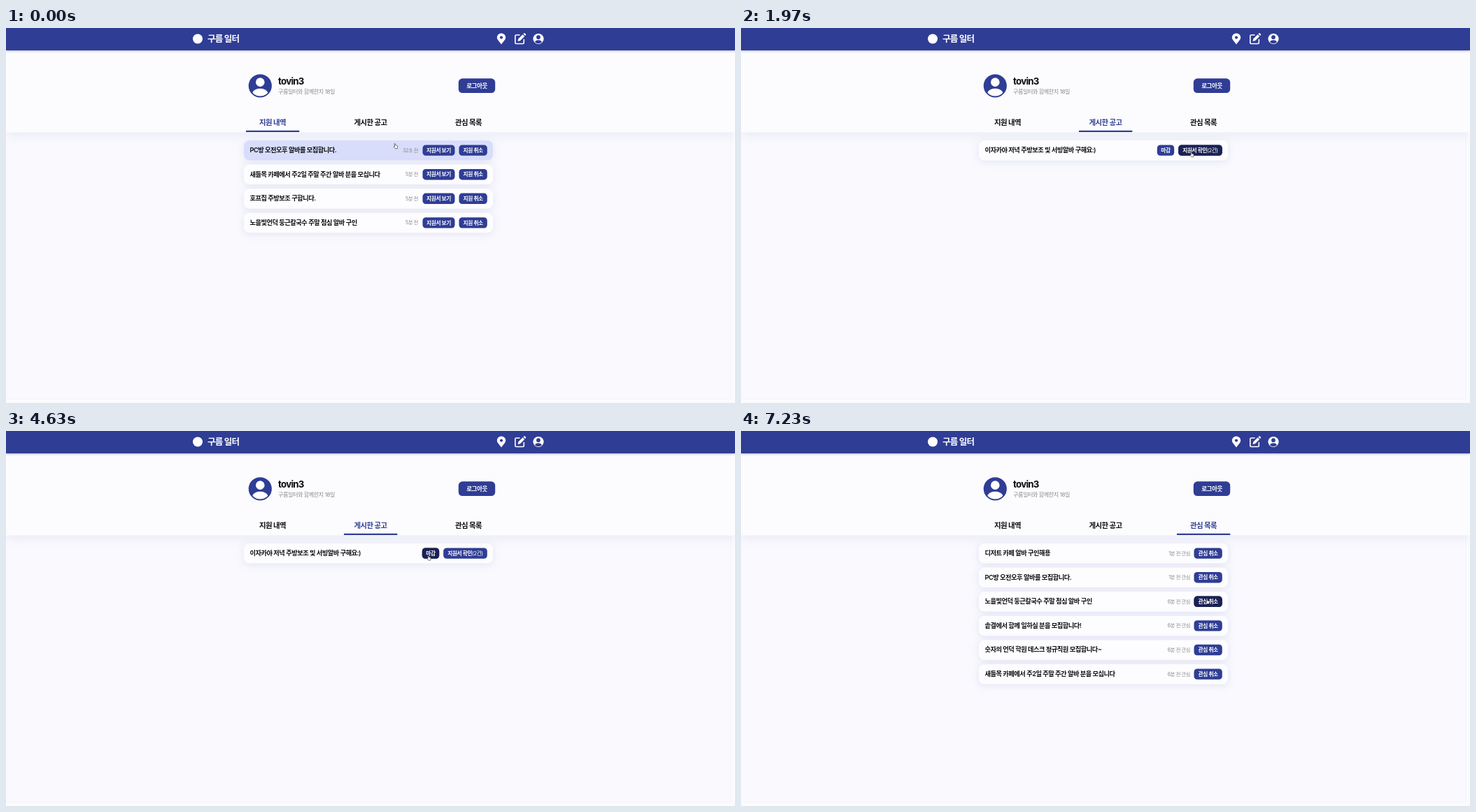
Recreate the animation shown at these times as an HTML page. Size 1042x537 px, loop 7.26 s.

```html
<!DOCTYPE html>
<html lang="ko">
<head>
<meta charset="utf-8">
<title>구름 일터</title>
<style>
html, body { margin: 0; width: 100%; height: 100%; overflow: hidden; background: #f9f9fe; }
svg { display: block; width: 1042px; height: 537px; }
text { font-family: Inter, "Noto Sans CJK KR", "Noto Sans CJK", sans-serif; letter-spacing: -.055em; white-space: pre; }
.card { filter: drop-shadow(0 2px 6px #2e3e951c); }
.bar { filter: drop-shadow(0 1px 1.5px #2e3e9566); }
.panel { filter: drop-shadow(0 3px 8px #2e3e9516); }
</style>
</head>
<body>
<svg id="stage" viewBox="0 0 1042 537"></svg>
<script>
const LOOP = 7260, NAVY = '#2f3d95', DARK = '#1a2153', GRAY = '#8a8a90', RED = '#d5302f';
const FADE = 90;
const at = { open: 450, close: 960, posts: 1400, applicants: 2130, back: 3900, likes: 5485, drop1: 6300, drop2: 7000 };

// cursor stops: time, x, y
const path = [
  [0, 557, 169], [60, 557, 169], [350, 618, 177], [480, 618, 177],
  [840, 622, 237], [970, 622, 237], [1340, 521, 138], [1450, 521, 138],
  [1890, 644.5, 181], [2180, 644.5, 181], [2700, 535, 174], [3430, 535, 174],
  [3820, 278, 16], [3950, 278, 16], [4500, 604.5, 181.5], [4950, 604.5, 181.5],
  [5430, 638, 142], [5620, 638, 142], [6080, 667, 211], [6350, 667, 211],
  [6650, 667, 244], [LOOP, 667, 244]
];

const applied = [
  ['PC방 오전오후 알바를 모집합니다.', '32초 전'],
  ['새들목 카페에서 주2일 주말 주간 알바 분을 모십니다', '5분 전'],
  ['호프집 주방보조 구합니다.', '5분 전'],
  ['노을빛언덕 둥근칼국수 주말 점심 알바 구인', '5분 전']
];
const liked = [
  ['디저트 카페 알바 구인해용', '1분 전 관심'],
  ['zv38 오늘 저녁 알바 구합니다. 급구!!', '1분 전 관심', at.drop1],
  ['PC방 오전오후 알바를 모집합니다.', '1분 전 관심'],
  ['호프집 주방보조 구합니다.', '6분 전 관심', at.drop2],
  ['노을빛언덕 둥근칼국수 주말 점심 알바 구인', '6분 전 관심'],
  ['솥결에서 함께 일하실 분을 모집합니다!', '6분 전 관심'],
  ['숫자의 언덕 학원 데스크 정규직원 모집합니다~', '6분 전 관심'],
  ['새들목 카페에서 주2일 주말 주간 알바 분을 모십니다', '6분 전 관심']
];

let now = 0, zones = [], blocked = false;

const clamp = v => Math.max(0, Math.min(1, v));
const smooth = v => (v = clamp(v), v * v * (3 - 2 * v));
const since = (start, length = FADE) => smooth((now - start) / length);

function cursorAt(t) {
  const i = Math.max(1, path.findIndex(p => p[0] >= t));
  const [a, b] = [path[i - 1], path[i]];
  const k = smooth((t - a[0]) / (b[0] - a[0]));
  return [a[1] + (b[1] - a[1]) * k, a[2] + (b[2] - a[2]) * k];
}

const inside = ([px, py], [x, y, w, h]) => px >= x && px <= x + w && py >= y && py <= y + h;

// share of the last moments the cursor spent in a box gives the fade
function hover(box, holes = []) {
  if (blocked) return 0;
  zones.push(box);
  const n = 9;
  let sum = 0;
  for (let i = 0; i < n; i++) {
    const p = cursorAt(Math.max(0, now - i * FADE / n));
    if (inside(p, box) && !holes.some(h => inside(p, h))) sum++;
  }
  return sum / n;
}

const rect = (x, y, w, h, fill, r = 0, extra = '') =>
  `<rect x="${x}" y="${y}" width="${w}" height="${h}" rx="${r}" fill="${fill}" ${extra}/>`;

const text = (x, y, s, size, fill = '#0c0c10', weight = 400, anchor = 'start') =>
  `<text x="${x}" y="${y + size * .36}" font-size="${size}" fill="${fill}" font-weight="${weight}" text-anchor="${anchor}">${s}</text>`;

const line = (d, color, width) =>
  `<path d="${d}" fill="none" stroke="${color}" stroke-width="${width}" stroke-linecap="round" stroke-linejoin="round"/>`;

const avatar = (x, y, r, back, front) => `<g transform="translate(${x} ${y}) scale(${r})">
  <circle r="1" fill="${back}"/><circle cy="-.31" r=".38" fill="${front}"/>
  <path d="M-.66 .6C-.5 .12 .5 .12 .66 .6A.89 .89 0 0 1-.66 .6Z" fill="${front}"/></g>`;

function button(box, label, size = 7.7, r = 4.5) {
  const [x, y, w, h] = box;
  return rect(...box, NAVY, r) + rect(...box, DARK, r, `opacity="${hover(box)}"`) +
    text(x + w / 2, y + h / 2, label, size, '#fff', 600, 'middle');
}

// buttons: [x, width, label]
function row(i, title, note, noteX, buttons) {
  const y = 161 + i * 34.6, box = [340, y, 356, 28.5];
  const boxes = buttons.map(([x, w]) => [x, y + 6.4, w, 15.4]);
  return rect(...box, '#fdfdff', 8, 'class="card"') +
    rect(...box, '#d8ddfc', 8, `opacity="${hover(box, boxes)}"`) +
    text(348.5, y + 13.7, title, 9.25, undefined, 600) +
    text(noteX, y + 14, note, 7.2, GRAY, 400, 'end') +
    buttons.map((b, k) => button(boxes[k], b[2])).join('');
}

function list(tab) {
  if (tab == 0) return applied.map(([title, ago], i) =>
    row(i, title, ago, 589, [[595.5, 46, '지원서 보기'], [647.5, 40.3, '지원 취소']])).join('');
  if (tab == 1) return row(0, '이자카야 저녁 주방보조 및 서빙알바 구해요:)', '', 589,
    [[594.8, 24.4, '마감'], [625.2, 62.6, '지원서 확인<tspan font-weight="400">(2건)</tspan>']]);
  return liked.filter(item => !(now >= item[2])).map(([title, ago], i) =>
    row(i, title, ago, 642, [[647.5, 40.3, '관심 취소']])).join('');
}

function mainHeader() {
  return rect(0, 0, 1042, 32, NAVY, 0, 'class="bar"') +
    '<circle cx="274" cy="15.5" r="7" fill="#fff"/>' +
    text(288, 15.5, '구름 일터', 12.5, '#fff', 800) +
    '<path d="M708 23.5C704.5 19 701.8 16.5 701.8 13.6A6.2 6 0 0 1 714.2 13.6C714.2 16.5 711.5 19 708 23.5Z" fill="#fff"/>' +
    `<circle cx="708" cy="13.6" r="2.1" fill="${NAVY}"/>` +
    line('M734 10H729.5Q727.8 10 727.8 11.7V20.8Q727.8 22.5 729.5 22.5H738.6Q740.3 22.5 740.3 20.8V16.5', '#fff', 1.6) +
    '<path d="M731.5 19L732.3 15.6 738.6 9.3 741.2 11.9 734.9 18.2ZM739.4 8.5L740.3 7.6Q741 7 741.7 7.6L742.9 8.8Q743.5 9.5 742.9 10.2L742 11.1Z" fill="#fff"/>' +
    avatar(761, 15.5, 7.6, '#fff', NAVY);
}

function modal() {
  const k = now < at.close ? since(at.open, 60) : 1 - since(at.close, 60);
  if (!k) return '';
  zones.push([614, 230, 15, 15]);
  const body = [
    '안녕하세요! 전 성실하고 책임감 있는 편입니다. 식당에서 알바한',
    '경험이 많아서 빠르게 배우고 적응할 수 있어요. 또 청결한 편이',
    '어서 주방보조 일도 잘 해낼 수 있슴다! 뽑아주시면 열심히 하겠',
    '습니다~'
  ];
  return `<g opacity="${k}">` + rect(0, 32, 1042, 505, '#000', 0, 'opacity=".34"') +
    rect(407, 223, 228, 89.6, '#fff', 7) +
    text(521, 239, '내 자기소개', 11.2, undefined, 700, 'middle') +
    line('M618 233.3L625.5 240.8M625.5 233.3L618 240.8', '#444', .9) +
    body.map((s, i) => text(419, 259.8 + i * 12.2, s, 8.2)).join('') + '</g>';
}

function profile() {
  const tab = now < at.posts ? 0 : now < at.likes ? 1 : 2;
  const slide = since(at.posts) + since(at.likes);
  blocked = now >= at.open && now < at.close;
  const tabs = ['지원 내역', '게시한 공고', '관심 목록'].map((s, i) => {
    hover([343 + i * 140, 124, 76, 25]);
    return text(381 + i * 140, 135.5, s, 10.4, i == tab ? NAVY : '#0c0c10', 600, 'middle');
  }).join('');
  return rect(0, 0, 1042, 537, '#f9f9fe') +
    line('M1036.5 150V531.5H0', '#f2f1f9', .8) +
    rect(1037, 150, 5, 387, '#fbfbfe') + rect(0, 532, 1042, 5, '#fbfbfe') +
    rect(0, 32, 1042, 117.5, '#fcfcfe', 0, 'class="panel"') +
    avatar(363.3, 82.8, 16.6, NAVY, '#fff') +
    `<g style="letter-spacing:0">${text(389, 76.5, 'tovin3', 13.3, undefined, 700)}</g>` +
    text(389, 91.5, '구름일터와 함께한지 18일', 8.1, GRAY) +
    button([646.8, 72.3, 52.4, 20.8], '로그아웃', 8.6, 5.5) +
    tabs + rect(343 + slide * 140, 146.8, 76.3, 2.2, NAVY) +
    list(tab) + modal() + mainHeader();
}

function applicant(y, h, color, state, name, lines) {
  return rect(330, y, 376, h, '#fdfdff', 8, 'class="card"') +
    `<circle cx="345" cy="${y + 13}" r="4" fill="none" stroke="${color}"/>` +
    line(`M343.2 ${y + 13}l1.4 1.5 3.3-3.6`, color, 1) +
    text(351.3, y + 13, state, 8.3, color, 700) +
    avatar(350.5, y + 32.6, 9, NAVY, '#fff') +
    text(365, y + 32.6, name, 10.4, undefined, 700) +
    text(389, y + 32.6, '·', 7.7, GRAY) + text(395.8, y + 32.6, '6시간', 7.7, GRAY) +
    lines.map((s, i) => text(340, y + 53.6 + i * 12.2, s, 7.75)).join('');
}

function applicants() {
  zones.push([270, 6, 16, 20]);
  return rect(0, 0, 1042, 537, '#faf9fe') +
    rect(0, 0, 1036, 32, NAVY, 0, 'class="bar"') +
    line('M280.5 10L274.8 15.6 280.5 21.2', '#fff', 1.5) +
    text(518, 15.5, '지원자 확인', 12.2, '#fff', 600, 'middle') +
    applicant(44, 79.6, NAVY, '채용 확정', '해든', [
      '안녕하세요! 전 성실하고 책임감 있는 편입니다. 식당에서 알바한 경험이 많아서 빠르게 배우고 적응할 수 있어요. 또 청결',
      '한 편이어서 주방보조 일도 잘 해낼 수 있슴다! 뽑아주시면 열심히 하겠습니다~'
    ]) +
    applicant(129.4, 67.4, RED, '채용 거절', '보람', ['뽑아만 주십셔, 열심히 뭐든 하게씀다!!']) +
    rect(1036, 0, 6, 537, '#fbfbfd') + line('M1036.3 0V537', '#ececf2', .6) +
    rect(1037.5, 0, 3.4, 481, '#bdbdc1', 1.7);
}

function cursor() {
  const p = cursorAt(now), hand = zones.some(z => inside(p, z));
  const d = hand
    ? 'M-1.9-3.4Q-1.3-4-.8-3.3L0-1 2-.6Q2.8-.3 2.7 .7L2.3 3.6H-.8L-2.6 1.2Q-2.9 .5-2.2 .4L-1.2 .9Z'
    : 'M-2.2-3.6V2.2L-.9 1 0 3.2 1.1 2.7 .2 .7H2Z';
  const paint = hand ? 'fill="#fff" stroke="#222"' : 'fill="#000" stroke="#fff"';
  return `<path d="${d}" transform="translate(${p})" ${paint} stroke-width=".6"/>`;
}

function frame() {
  now = performance.now() % LOOP;
  zones = [];
  blocked = false;
  const page = now >= at.applicants && now < at.back ? applicants() : profile();
  document.getElementById('stage').innerHTML = page + cursor();
  requestAnimationFrame(frame);
}
frame();
</script>
</body>
</html>
```
